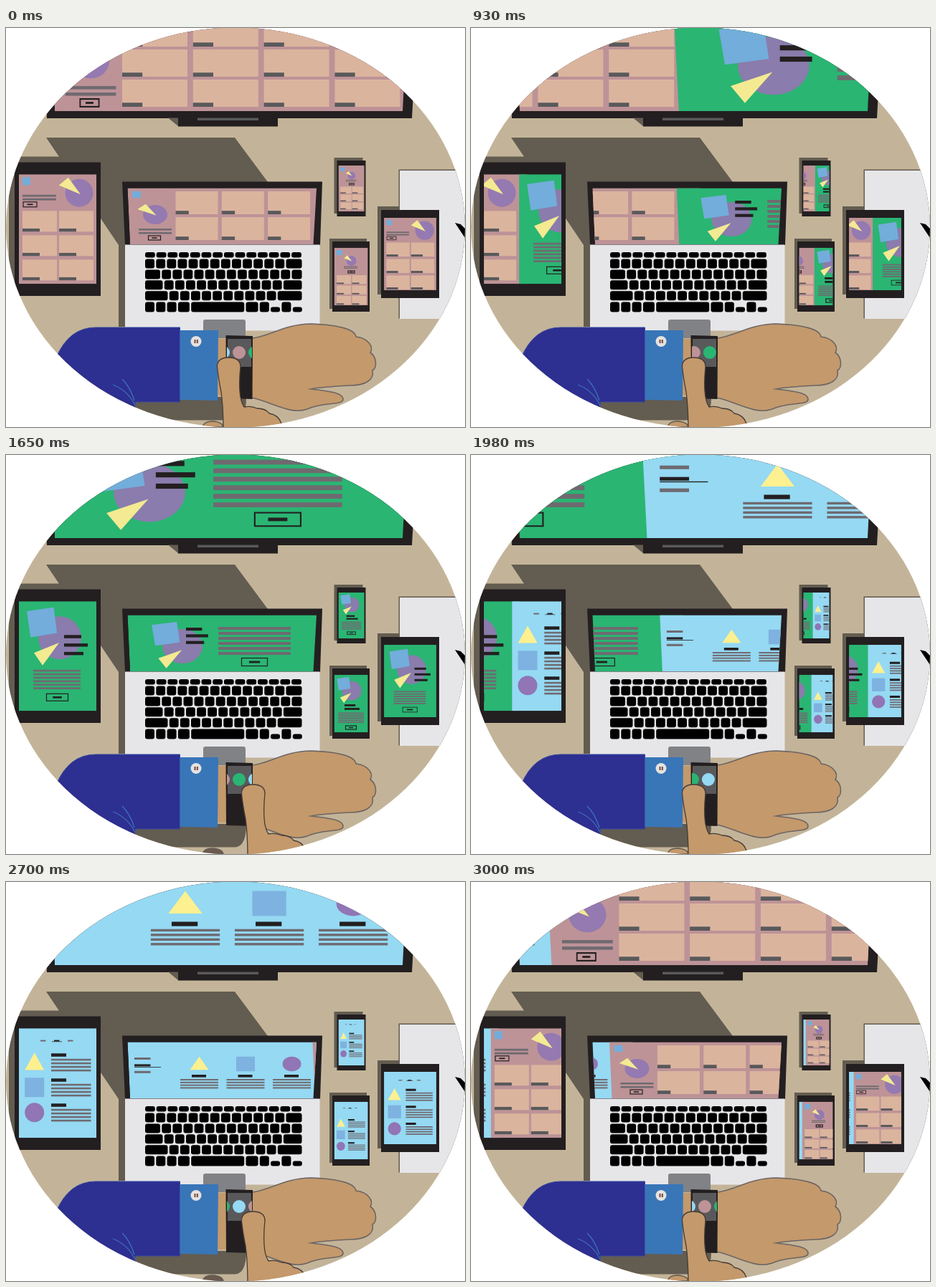
Recreate the animation shown at these times as an HTML page with a canvas. Size 640 px wide and 557 px high, loop 3.03 s.

```html
<!DOCTYPE html>
<html lang="en">
<head>
<meta charset="utf-8">
<title>Swipe across devices</title>
<style>
html, body { margin: 0; height: 100%; overflow: hidden; background: #fff; }
canvas { display: block; }
</style>
</head>
<body>
<canvas id="stage" width="640" height="557"></canvas>
<script>
const c = document.getElementById('stage').getContext('2d');
const INK = '#231f20', GREY = '#6f6a70', LABEL = '#59595b', DESK = '#c3b499', SHADE = '#635c50',
  CARD = '#dbb49e', PURPLE = '#9579b1', PLUM = '#8a7cac', VIOLET = '#9175b5', SQUARE = '#73addb',
  SKY = '#7eb2e0', YELLOW = '#f3ea92', LEMON = '#fdf090', SKIN = '#c4996b', PAPER = '#e6e6e9';
const PAGES = ['#bd9397', '#2ab573', '#95d9f3'];
const LOOP = 3030, STEP = 30, SWIPE = 330, BACK = 450, STARTS = [750, 1770, 2700];

function rect(color, x, y, w, h) { c.fillStyle = color; c.fillRect(x, y, w, h); }
function round(color, x, y, w, h) {
  c.beginPath(); c.roundRect(x, y, w, h, 3); c.fillStyle = color; c.fill();
}
function trace(pts) {
  c.beginPath();
  for (let i = 0; i < pts.length; i += 2) c.lineTo(pts[i], pts[i + 1]);
  c.closePath();
}
function poly(color, ...pts) { trace(pts); c.fillStyle = color; c.fill(); }
function oval(color, x, y, rx, ry = rx) {
  c.beginPath(); c.ellipse(x, y, rx, ry, 0, 0, 7); c.fillStyle = color; c.fill();
}
function path(d, fill, stroke, width = 1.3) {
  const p = new Path2D(d);
  if (fill) { c.fillStyle = fill; c.fill(p); }
  if (stroke) { c.strokeStyle = stroke; c.lineWidth = width; c.stroke(p); }
}
// Draws with the point (x, y) moved to (toX, toY) and everything scaled about it.
function place(draw, x, y, toX, toY, sx, sy = sx) {
  c.save();
  c.translate(toX, toY); c.scale(sx, sy); c.translate(-x, -y);
  draw();
  c.restore();
}

// Building blocks of the pages
function lines(x, y, w, h, n, gap) { for (let i = 0; i < n; i++) rect(GREY, x, y + i * gap, w, h); }
function button(x, y, w, h) {
  c.strokeStyle = INK; c.lineWidth = 1.2; c.strokeRect(x, y, w, h);
  rect(INK, x + w * .29, y + h * .37, w * .42, h * .26);
}
function cards(x, y, w, h, dx, dy, cols, count) {
  for (let i = 0; i < count; i++) {
    const cx = x + i % cols * dx, cy = y + Math.floor(i / cols) * dy;
    rect(CARD, cx, cy, w, h);
    rect(LABEL, cx, cy + h * .85, w * (cols > 2 ? .31 : .5), h * .15);
  }
}
function hero(x, y, rx, ry = rx) {
  oval(PURPLE, x, y, rx, ry);
  poly(YELLOW, x - 1.45 * rx, y - .55 * ry, x - .78 * rx, y - 1.1 * ry, x + .1 * rx, y + .1 * ry);
}
function cluster(x, y, rx, ry = rx) {
  oval(PLUM, x, y, rx, ry);
  place(() => {
    poly(SQUARE, -1.53, -1.24, -.28, -1.42, -.13, -.23, -1.36, -.03);
    poly(YELLOW, -1.2, .7, -.03, .22, -.8, 1.28);
  }, 0, 0, x, y, rx, ry);
}
function title(x, y, size, gap, n = 3) {
  for (let i = 0; i < n; i++) rect(INK, x, y + i * gap, size * [.8, 1.1, .9][i], size * .15);
}
function item(i, x, y, w, h) {
  if (i == 0) poly(LEMON, x, y - h / 2, x - w / 2, y + h * .4, x + w / 2, y + h * .4);
  if (i == 1) rect(SKY, x - w / 2, y - h / 2, w, h);
  if (i == 2) oval(VIOLET, x, y, w / 2, h / 2);
}

function wideHero() {
  rect(SQUARE, 176, 228, 12, 9);
  hero(208, 260.5, 17, 13.5);
  lines(185, 280, 46, 2.5, 2, 5);
  button(198.5, 290, 17, 6);
}
const laptop = [
  () => { cards(236.5, 228, 59, 32, 64.3, 36, 3, 6); wideHero(); },
  () => {
    cluster(246, 267, 28, 24);
    title(251, 241, 28, 9.3);
    lines(296, 240, 101, 4, 6, 7);
    button(328.5, 283.5, 36, 11);
  },
  () => {
    for (let i = 0; i < 3; i++) {
      rect(i == 1 ? INK : GREY, 179, 245 + i * 9.4, 22.5, 3);
      const x = 269.5 + i * 64.5;
      item(i, x, 254, 26, 20.5);
      rect(INK, x - 10.5, 269, 20, 3.6);
      lines(x - 26.5, 275, 53, 2, 4, 3.8);
    }
    rect(INK, 179, 258, 37, .8);
  }
];
const tv = [
  () => {
    cards(162, -12, 91, 38, 98.8, 42, 4, 12);
    place(wideHero, 208, 260.5, 118, 46, 1.54, 1.8);
  },
  () => place(laptop[1], 246, 267, 200, 52.5, 1.78, 1.7),
  () => place(laptop[2], 269.5, 254, 250, 30, 1.815, 1.7)
];

function nav() {
  for (let i = 0; i < 3; i++) rect(i == 1 ? INK : GREY, 48 + i * 19, 220.3, 7.5, 2);
  rect(INK, 64, 222.2, 14, .7);
}
function list() {
  for (let i = 0; i < 3; i++) {
    const y = 251.5 + i * 35;
    item(i, 39.7, y, 27, 27);
    rect(INK, 63, y - 12.5, 21, 4.5);
    lines(63, y - 5, 55.5, 2.6, 4, 5);
  }
}
function tallCards() { cards(23, 255, 48, 29, 51, 34, 2, 6); }
const tablet = [
  () => {
    tallCards();
    rect(SQUARE, 23, 208, 11, 11);
    hero(102, 230, 19.5);
    lines(23, 232.5, 47, 2.8, 2, 5);
    button(24, 242.5, 19, 7);
  },
  () => {
    cluster(75, 255, 30);
    title(81, 251, 30, 11.8);
    lines(38, 299.5, 66, 2.7, 6, 4.9);
    button(56.5, 333, 30, 10);
  },
  () => { nav(); list(); }
];
const phone = [
  () => {
    place(tallCards, 23, 255, 461, 345, .42, .425);
    rect(SQUARE, 461, 310, 8, 7);
    hero(481.5, 325, 7);
    lines(471, 332.5, 19, 1.2, 2, 2.2);
    button(477, 339, 9, 3);
  },
  () => {
    cluster(482, 329, 13.5);
    title(472, 348, 19, 5, 2);
    lines(463, 359.5, 36, 1.6, 6, 2.6);
    button(473.5, 378, 15, 5);
  },
  () => {
    place(nav, 67, 220, 478, 315, .43);
    place(list, 40, 239, 467, 331, .43, .46);
  }
];

let page, progress, handLeft;

function screen(outline, pages, x, y, w, h, pitch, slant = 0) {
  c.save();
  trace(outline); c.clip();
  const draw = (k, dx) => {
    c.save();
    c.translate(dx, 0);
    poly(PAGES[k], x, y, x + w * 1.1, y, x + w * 1.1, y + h, x + slant, y + h);
    pages[k]();
    c.restore();
  };
  draw(page, -pitch * progress);
  if (progress || page == 2) draw((page + 1) % 3, pitch * (1 - progress));
  c.restore();
}

// Hand-held devices: body, height of the shadow, pages and the screen box the pages are laid out in
const HANDHELD = [
  { x: 12, y: 187.5, w: 120, h: 186.5, lift: 8, pages: tablet, view: [18, 204, 108] },
  { x: 523, y: 254, w: 81, h: 123, lift: 5, pages: tablet, view: [18, 204, 108] },
  { x: 455, y: 298, w: 52, h: 98, lift: 4, pages: phone, view: [457.6, 306.8, 46.8] },
  { x: 461.5, y: 185, w: 40, h: 78, lift: 4, pages: phone, view: [457.6, 306.8, 46.8] }
];
function handheld({ x, y, w, h, pages, view: [vx, vy, vw] }) {
  rect(INK, x, y, w, h);
  const scale = w * .9 / vw, vh = h * .82 / scale;
  place(() => screen([vx, vy, vx + vw, vy, vx + vw, vy + vh, vx, vy + vh], pages, vx, vy, vw, vh, vw),
    vx, vy, x + w * .05, y + h * .09, scale);
}

function keyboard() {
  const left = 194, right = 412.5, gap = 2.3, pitch = 15.1;
  for (let i = 0; i < 14; i++) round('#000', left + i * 15.7, 313, 13.8, 7.5);
  [13, 21, 24.5, 31.5].forEach((first, r) => {
    const y = 322.5 + r * 14.9, count = 12 - Math.max(0, r - 1);
    round('#000', left, y, first, 13);
    for (let i = 0; i <= count; i++) {
      const x = left + first + gap + i * pitch;
      round('#000', x, y, i < count ? pitch - gap : right - x, 13);
    }
  });
  let x = left;
  for (const w of [13, 13, 13, 16, 74, 17, 13]) { round('#000', x, 382.5, w, 14); x += w + gap; }
  for (let i = 0; i < 3; i++) round('#000', 369 + i * 15.4, i == 1 ? 382.5 : 389.5, 13, i == 1 ? 14 : 7);
}

function desk() {
  rect(DESK, 0, 0, 640, 557);
  poly(SHADE, 56, 153, 319, 153, 365, 215, 365, 417, 157, 417, 157, 303);
  poly(INK, 50, 0, 573, 0, 566, 126, 57, 126);
  poly(SHADE, 226, 125.5, 240, 125.5, 240, 137);
  rect(INK, 240, 124, 139, 13.5);
  rect(LABEL, 267, 125.5, 85, 3.5);
  screen([62, 0, 559, 0, 553, 116, 68, 116], tv, 62, 0, 500, 116, 488, 6);

  for (const { x, y, w, h, lift } of HANDHELD) rect(SHADE, x - lift, y - lift, w, h);
  rect(SHADE, 547.5, 197.5, 93, 208);
  rect(PAPER, 549, 199, 91, 207);
  poly('#000', 626, 272, 634, 274, 640, 280, 640, 293);
  HANDHELD.forEach(handheld);

  poly(INK, 162, 214.5, 441, 214.5, 438, 303, 166, 303);
  screen([169.5, 223.5, 433, 223.5, 428.5, 302, 173, 302], laptop, 169.5, 223.5, 264, 78.5, 258, 3.5);
  rect(PAPER, 166, 302.5, 271.5, 120);
  keyboard();
  round('#808285', 275, 407, 59, 26);
}

function arm() {
  path('M170 515H335Q335 547 319 547.5H170Z', SHADE);
  path('M274 557Q276 549 288 549Q302 550 303 557Z', handLeft > .5 ? SKIN : '#6b5a50', SHADE);
  rect(SKIN, 294, 434, 16, 79);
  path('M343 433C366 431 390 413 425 413C452 414 486 418 488 431C505 433 513 445 508 453' +
    'C518 460 517 475 511 478C514 492 500 499 480 499Q440 501 425 504C446 507 471 508 470 519' +
    'C468 527 440 522 420 532C396 541 366 520 342 516Z', SKIN, '#6d6563', 1.6);
  path('M242.500 418H125Q88 418 70 460V560H180V522H242.500Z', '#2d2f91', '#34489c', 1);
  path('M149 498Q170 506 180 527M162 490Q173 501 179 520', null, '#3e6fb5');
  poly('#3876b8', 242.5, 422, 296, 422, 295, 520, 242.5, 519);
  oval('#e6e2df', 265, 437.5, 7.5);
  for (const x of [262.5, 265.8]) rect('#714a42', x, 435, 2, 5);

  poly(INK, 306.5, 429, 344, 430, 343.5, 518, 307, 517);
  rect(LABEL, 309, 434, 33, 39);
  c.save();
  c.beginPath(); c.rect(308, 434, 35, 39); c.clip();
  const shift = progress ? 1 - (1 - progress) ** 1.3 : 0;
  for (let i = -1; i < 3; i++) oval(PAGES[(page + i + 3) % 3], 325 + (i - shift) * 22, 453, 9);
  c.restore();

  c.save();
  c.translate(34 * (1 - handLeft), 0);
  path('M303 562Q303 530 300 508Q296 488 294.500 473C294 464 301 460 310 460C320 460 327 464 327 473' +
    'Q325 490 326 507Q327 522 332 529Q342 527 350 531Q362 531 367 538Q380 540 384 552L388 562Z', SKIN, '#453b36');
  c.restore();
}

function render(now) {
  let t = Math.floor(now % LOOP / STEP) * STEP;
  if (t < STARTS[0]) t += LOOP;
  const i = STARTS.findLastIndex(s => s <= t), since = t - STARTS[i];
  const done = since >= SWIPE;
  page = done ? (i + 1) % 3 : i;
  progress = done ? 0 : since / SWIPE;
  handLeft = done ? Math.max(0, 1 - (since - SWIPE) / BACK) : Math.min(1, since / 150);

  c.clearRect(0, 0, 640, 557);
  c.save();
  c.beginPath(); c.ellipse(320, 278.5, 320, 279, 0, 0, 7); c.clip();
  desk();
  arm();
  c.restore();
}

const begin = performance.now();
function frame() {
  render(performance.now() - begin);
  requestAnimationFrame(frame);
}
frame();
</script>
</body>
</html>
```
